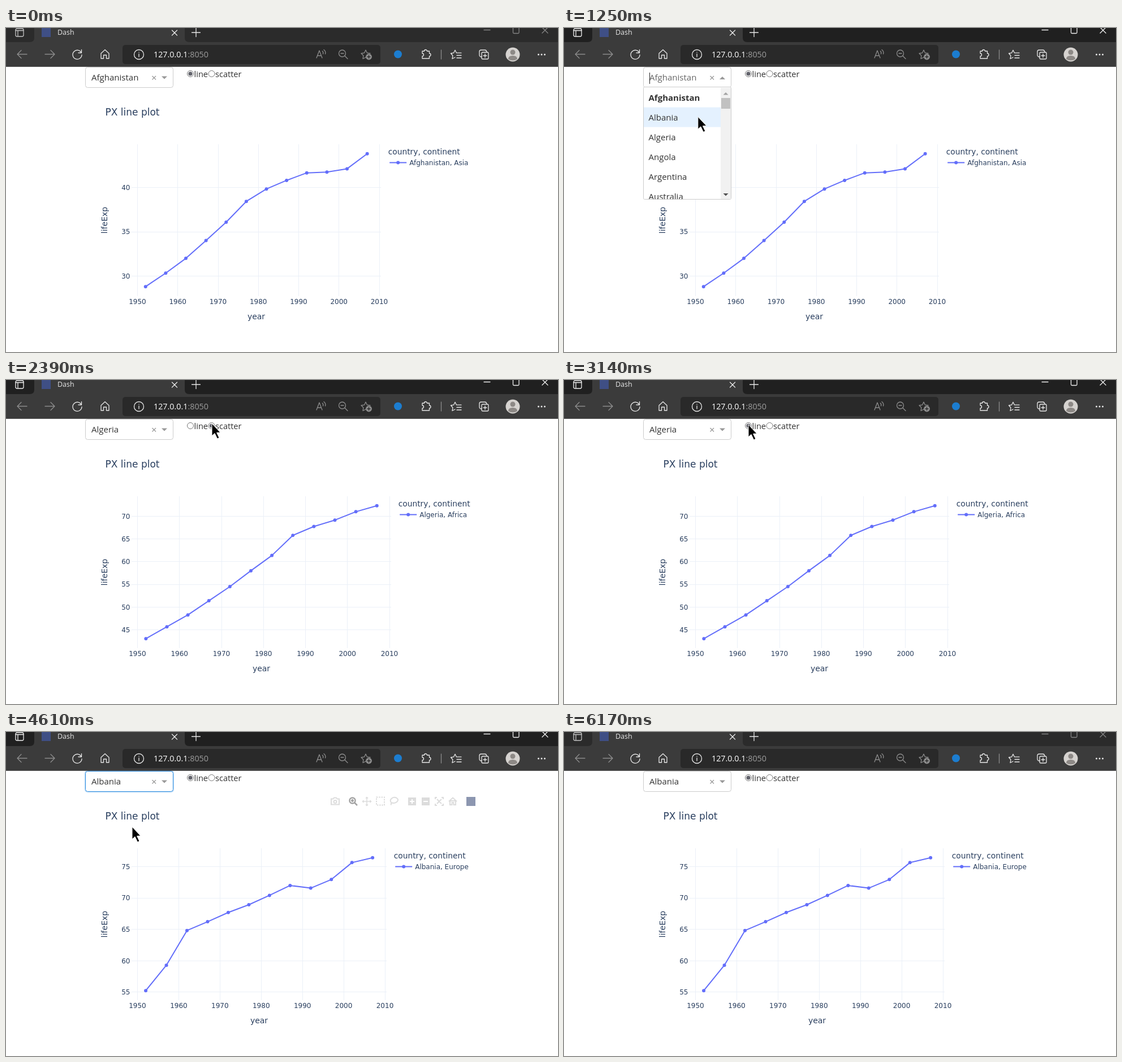
Animation of 976x574 px, one loop 6240 ms. Source, as an HTML page:

```html
<!DOCTYPE html>
<html lang="en">
<head>
<meta charset="utf-8">
<title>Dash</title>
<style>
html, body { margin: 0; width: 100%; height: 100%; overflow: hidden; background: #fff; }
svg { display: block; width: 976px; height: 574px; }
text { white-space: pre; }
.ui { font-family: "Open Sans", sans-serif; font-size: 15px; fill: #333; }
.plot { font-family: "DejaVu Sans", sans-serif; font-size: 12px; fill: #2a3f5f; }
.icon { fill: none; stroke: #e8e8e8; stroke-width: 1.3; stroke-linecap: round; stroke-linejoin: round; }
.dim { stroke: #8c8c8c; }
.mode { fill: none; stroke: #444; stroke-width: 2; opacity: .18; }
</style>
</head>
<body>
<svg viewBox="0 0 976 574">
  <rect width="976" height="574" fill="#fff"/>

  <g id="chart" class="plot"></g>
  <g id="modebar">
    <g class="mode">
      <path d="M575 118.500h3.500l1.500-2h4l1.500 2h3.500v10h-14Z"/><circle cx="582" cy="123.500" r="2.500"/>
      <path d="M638 116v14M631 123h14M636 117.500l2-2 2 2M636 128.500l2 2 2-2M632.500 121l-2 2 2 2M643.500 121l2 2-2 2" stroke-width="1.500"/>
      <rect x="655" y="115.500" width="14" height="14" stroke-dasharray="2.500 1.800"/>
      <path d="M682 126q-4-4-1-7.500 4-4 9-2 5 3 2 6.500-4 4-9 2.500-3 0-2 4"/>
      <path d="M711 123h14M735 123h14" stroke-width="14"/>
      <path d="M762 119l8 8m0-8l-8 8M759 119v-3h3M770 116h3v3M773 127v3h-3M762 130h-3v-3"/>
      <path d="M785 122h10v7h-3.500v-4h-3v4H785ZM783 123l7-6.500 7 6.500"/>
    </g>
    <path d="M714 123h8M718 119v8M738 123h8" stroke="#fff" stroke-width="2"/>
    <g fill="none" stroke="#a3a3a3" stroke-width="2.500"><circle cx="612.500" cy="121.500" r="5"/><path d="M616 125l5 5M610 121.500h5M612.500 119v5"/></g>
    <rect x="814" y="115" width="16" height="16" fill="#8c96b0"/>
  </g>
  <g id="controls" class="ui"></g>

  <g id="strip"></g>
  <path d="M0 25H42Q50 25 50 17V0H316V17Q316 25 324 25H976V69H0Z" fill="#3b3b3b"/>
  <path d="M0 68.500H976" stroke="#606060"/>
  <rect x="206" y="30" width="456" height="34" rx="5" fill="#292929"/>
  <rect x="63" y="0" width="16" height="16" fill="#3f4f85"/>
  <g id="window"></g>
  <g class="ui">
    <text x="91" y="12" font-size="12.5" fill="#e8e8e8">Dash</text>
    <text x="261" y="52" font-size="14.3" fill="#fff">127.0.0.1<tspan fill="#9d9d9d">:8050</tspan></text>
  </g>
  <g class="icon">
    <path d="M293.500 4l9 9m0-9l-9 9M328.500 8h15M336 .5v15"/>
    <path class="dim" d="M37 46.500H20m7-7l-7 7 7 7M69 46.500h17m-7-7l7 7-7 7"/>
    <path d="M133.300 44A8 8 0 1 0 134 47.500M133.500 38.500V44H128"/>
    <path d="M168 45l7-6.500 7 6.500v9h-4.500v-6h-5v6H168Z"/>
    <circle cx="235" cy="47" r="8.500"/><path d="M235 46v5M235 43v.2"/>
    <g class="dim">
      <path d="M549 53l5-13 5 13m-8.300-4h6.600M559.500 41q2 2 1 5M562 38.500q4 3 2.500 7.500"/>
      <circle cx="594.500" cy="45" r="6"/><path d="M599 49.500l5 5M592 45h5"/>
      <path d="M638 53l-2-1-5 2.500 1-5.500-4-4 5.500-.8L636 39l2.500 5.200 5.500.8"/>
      <circle cx="641.500" cy="51" r="4.800" fill="#8c8c8c"/><path d="M639 51h5M641.500 48.500v5" stroke="#292929"/>
    </g>
    <path d="M736 41h3.500a2.500 2.500 0 1 1 5 0h4v4a2.500 2.500 0 1 1 0 5v4H736v-4a2.500 2.500 0 1 0 0-5Z"/>
    <path d="M769.500 39V55" class="dim"/>
    <path d="M794 52l-5 2.500 1-5.500-3.500-4 5-.8 2.500-5 2.500 5H805M797 48.500h8M797 53h8"/>
    <path d="M841 51h-2q-2-1-2-3v-6q0-3 3-3h7q2 0 3 3"/>
    <rect x="841" y="43" width="12" height="12" rx="2"/><path d="M847 46v6M844 49h6"/>
  </g>
  <circle cx="693" cy="46.500" r="7" fill="#1c7dd0"/>
  <circle cx="896" cy="47" r="12.500" fill="#d6d3d0"/>
  <circle cx="896" cy="43" r="4.500" fill="#8d8986"/>
  <path d="M888 55q0-6 8-6t8 6q-8 5-16 0Z" fill="#8d8986"/>
  <g fill="#e8e8e8"><circle cx="941.500" cy="47" r="1.500"/><circle cx="947" cy="47" r="1.500"/><circle cx="952.500" cy="47" r="1.500"/></g>

  <g id="pointer"></g>
</svg>
<script>
const LOOP = 6240;
const countries = ["Afghanistan", "Albania", "Algeria", "Angola", "Argentina", "Australia"];
const series = {
  Afghanistan: { continent: "Asia", yearWidth: 7.125, center: 442.5,
    life: [28.8, 30.33, 32, 34.02, 36.09, 38.44, 39.85, 40.82, 41.67, 41.76, 42.13, 43.83] },
  Algeria: { continent: "Africa", yearWidth: 7.425, center: 451.5,
    life: [43.08, 45.69, 48.3, 51.41, 54.52, 58.01, 61.37, 65.8, 67.74, 69.15, 70.99, 72.3] },
  Albania: { continent: "Europe", yearWidth: 7.292, center: 447.5,
    life: [55.23, 59.28, 64.82, 66.22, 67.69, 68.93, 70.42, 72, 71.58, 72.95, 75.65, 76.42] }
};
// Pointer path: time, x, y
const path = [
  [130, 415, 203], [250, 395, 190], [400, 336, 134], [560, 295, 100], [690, 276, 83],
  [900, 276, 83], [1250, 237, 157], [1370, 218, 188], [1750, 218, 188], [2120, 364, 78],
  [2190, 364, 77], [2650, 364, 77], [2930, 326, 79], [3150, 326, 79], [3480, 276, 83],
  [4080, 276, 83], [4330, 223, 168], [5120, 223, 168], [5350, 487, 186], [5620, 897, 533]
];
const clicks = [760, 1500, 2330, 2990, 3880, 4340];

const between = (t, from, to) => t >= from && t < to;
const text = (x, y, s, attrs = "") => `<text x="${x}" y="${y}" ${attrs}>${s}</text>`;
const size = px => `font-size="${px}"`;

const shown = {};
function put(id, markup) {
  if (shown[id] === markup) return;
  shown[id] = markup;
  document.getElementById(id).innerHTML = markup;
}

function pointerAt(t) {
  if (!between(t, 130, 5620)) return null;
  const i = path.findIndex(p => p[0] > t);
  const [t0, x0, y0] = path[i - 1], [t1, x1, y1] = path[i];
  const k = (t - t0) / (t1 - t0);
  return { x: x0 + (x1 - x0) * k, y: y0 + (y1 - y0) * k };
}

function tabStrip(active) {
  return `<rect width="976" height="30" fill="${active ? "#202020" : "#2b2b2b"}"/>`;
}

function windowIcons(active) {
  const left = active ? "#f0f0f0" : "#c4c4c4", right = active ? "#f0f0f0" : "#858585";
  return `<g class="icon"><rect x="17" y="1" width="14" height="14" rx="2.5" style="stroke:${left}"/>
    <path d="M17 4.500h14M21 5v9" style="stroke:${left}"/>
    <path d="M845 3.500h11M896.500-1v9q0 1.500 1.500 1.500h7.500q1.500 0 1.500-1.500v-9M948-1l10 10m0-10l-10 10" style="stroke:${right}"/></g>`;
}

function chart(country, scatter) {
  const { continent, yearWidth, center, life } = series[country];
  const low = life[0], high = life[life.length - 1], unit = 235.4 / (high - low);
  const left = 222, right = 2 * center - left, top = 206, bottom = 475;
  const px = year => 232.5 + (year - 1950) * yearWidth;
  const py = value => 458.2 - (value - low) * unit;
  let grid = "", labels = "";
  for (let year = 1950; year <= 2010; year += 10) {
    grid += `M${px(year)} ${top}V${bottom}`;
    labels += text(px(year), 489, year, 'text-anchor="middle"');
  }
  for (let value = 30; value < 80; value += 5) {
    const y = py(value);
    if (!between(y, top, bottom)) continue;
    grid += `M${left} ${y}H${right}`;
    labels += text(219.5, y + 4.3, value, 'text-anchor="end"');
  }
  const points = life.map((value, i) => [px(1952 + 5 * i), py(value)]);
  const legend = right + 12.7;
  const dots = [...points, [legend + 17.5, 238.5]];
  const lines = scatter ? "" : `<path d="M${points.join("L")}M${legend + 2.5} 238.500h30"
    fill="none" stroke="#636efa" stroke-width="2" stroke-linejoin="round"/>`;
  return `<path d="${grid}" stroke="#ebf0f8" fill="none" shape-rendering="crispEdges"/>${labels}${lines}` +
    dots.map(([x, y]) => `<circle cx="${x}" cy="${y}" r="3" fill="#636efa"/>`).join("") +
    text(175.5, 155, `PX ${scatter ? "scatter" : "line"} plot`, size(17)) +
    text(center, 516, "year", 'text-anchor="middle" ' + size(14)) +
    text(0, 0, "lifeExp", 'text-anchor="middle" transform="translate(179 340.5) rotate(-90)" ' + size(14)) +
    text(legend, 224, "country, continent", size(13.8)) +
    text(legend + 37.5, 243, `${country}, ${continent}`);
}

function radio(x, label, on) {
  return `<circle cx="${x}" cy="81" r="5.500" fill="#fff" stroke="#767676"/>` +
    (on ? `<circle cx="${x}" cy="81" r="3.600" fill="#62636c"/>` : "") +
    text(x + 6.5, 87, label, size(14.6));
}

function menu(selected, hovered) {
  const rows = countries.map((name, i) => {
    const y = 105.5 + 35 * i;
    return (i === hovered ? `<rect x="141" y="${y}" width="136" height="35" fill="#e4f1fe"/>` : "") +
      text(149.5, y + 23, name, name === selected ? 'font-weight="700"' : "");
  }).join("");
  return `<clipPath id="menuClip"><rect x="141" y="105" width="154" height="198"/></clipPath>
    <rect x="140.500" y="104.500" width="155" height="199" rx="2" fill="#fff" stroke="#ccc"/>
    <g clip-path="url(#menuClip)">${rows}<rect x="277" y="106" width="18" height="198" fill="#f1f1f1"/></g>
    <rect x="278" y="124" width="16" height="19" fill="#c1c1c1"/>
    <path d="M281.500 118.500h9l-4.500-4.500Z" fill="#a3a3a3"/><path d="M281.500 293h9l-4.500 4.500Z" fill="#505050"/>`;
}

function dropdown(country, open, focused, hovered) {
  const glow = focused ? '<rect x="139.500" y="68.500" width="157" height="38" rx="5" fill="none" stroke="#d3e8fb" stroke-width="2"/>' : "";
  const arrow = open ? "M275 91h10l-5-5Z" : "M275 85.500h10l-5 5Z";
  return glow + `<rect x="140.500" y="69.500" width="155" height="36" rx="4" fill="#fff" stroke="${focused ? "#2387dd" : "#ccc"}"/>` +
    text(151, 93, country, open ? 'fill="#666"' : "") +
    (open ? '<path d="M151.500 79v20" stroke="#222"/>' : "") +
    `<path d="M258.500 85l6.500 6.500m0-6.500l-6.500 6.500" stroke="#999" stroke-width="1.300"/>
    <path d="${arrow}" fill="#999"/>` + (open ? menu(country, hovered) : "");
}

function pointer(p, open, clicked) {
  let shape = '<path d="M0 0V22L5 17.500 9.500 27 13 25.400 8.600 16.300 15 16Z" fill="#000" stroke="#fff"/>';
  if (p.x < 296 && p.y < 106) {
    shape = `<path d="M-2 0q2-2 3.500 0l1 6 2 .3 2 .7 2 1q1.500 0 1.500 3l-.5 4-1.500 2.500v2H0v-2l-6-7q0-2 2-2l3 2Z"
      fill="#fff" stroke="#111" stroke-width="1.200"/><path d="M3 6l.5 4M6 7l.3 4" stroke="#111"/>`;
  } else if (!open && p.x < 226 && p.y > 180) {
    shape = `<path d="M-6 -5.500L6 6.500" stroke="#000" stroke-width="1.600"/>
      <path d="M-8-7.500h6.500l-6.500 6.500ZM8 8.500h-6.500l6.500-6.500Z" fill="#000"/>`;
  }
  const halo = clicked ? `<circle cx="${p.x - 3}" cy="${p.y + 1}" r="13.500" fill="#fff02e" fill-opacity=".8"/>` : "";
  return `${halo}<g transform="translate(${p.x} ${p.y})">${shape}</g>`;
}

function render(t) {
  const p = pointerAt(t);
  const active = between(t, 760, 6170);
  const open = between(t, 760, 1560) || between(t, 3880, 4400);
  const focused = between(t, 1560, 2330) || between(t, 4400, 6170);
  const picked = t < 1560 ? "Afghanistan" : t < 4400 ? "Algeria" : "Albania";
  const plotted = t < 1710 ? "Afghanistan" : t < 4540 ? "Algeria" : "Albania";
  const scatter = between(t, 2330, 2990);
  const hovered = p && p.y > 106 ? Math.floor((p.y - 105.5) / 35) : countries.indexOf(picked);

  put("strip", tabStrip(active));
  put("window", windowIcons(active));
  put("chart", chart(plotted, between(t, 2530, 3120)));
  put("controls", radio(326, "line", !scatter) + radio(363.5, "scatter", scatter) +
    dropdown(picked, open, focused, hovered));
  put("pointer", p ? pointer(p, open, clicks.some(c => between(t, c, c + 60))) : "");
  document.getElementById("modebar").style.display = p && !open && p.y > 112 ? "" : "none";
}

const start = performance.now();
function tick() {
  render((performance.now() - start) % LOOP);
  requestAnimationFrame(tick);
}
tick();
</script>
</body>
</html>
```
